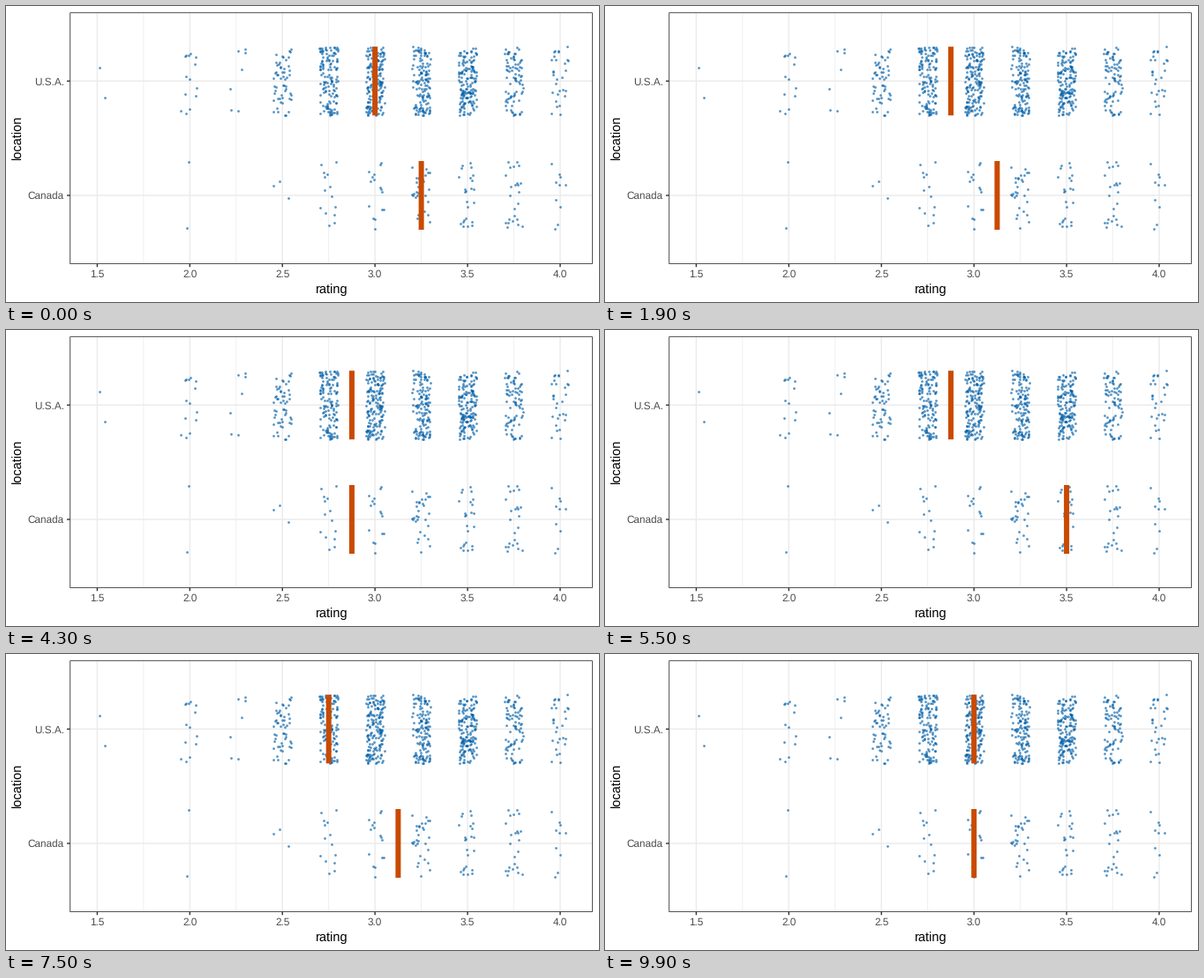
These frames come from a looping animation (672 px wide and 336 px high, 10000 ms). A matplotlib script:

```python
import numpy as np
import matplotlib.pyplot as plt
from matplotlib.animation import FuncAnimation

W, H, DPI = 672, 336, 100
PX = 72 / DPI  # points per pixel
LEFT, TOP, RIGHT, BOTTOM = 72.7, 7.7, 664.4, 292.6
ROW = {"U.S.A.": 85.2, "Canada": 215}
HALF = 39  # half height of a bar and of the jitter band
BLUE, ORANGE, GRID, DARK, GREY = "#005FA8", "#C94A00", "#EBEBEB", "#333333", "#4D4D4D"
STEPS = 4  # three still frames and one halfway frame per draw

plt.rcParams.update({"font.family": "Liberation Sans", "path.snap": False,
                     "text.hinting": "none"})

# One drawn rating per location (U.S.A., Canada); each holds, then slides on.
DRAWS = np.array([
    (3, 3.25), (2.5, 3.75), (3, 3.5), (3.25, 4), (3, 3.25),
    (2.75, 3), (3, 3.25), (3.75, 3), (2.75, 3.25), (3, 3.5),
    (2.75, 2.5), (3, 3.25), (3, 3.25), (3.25, 3.25), (2.5, 3.75),
    (3.25, 2.75), (3, 4), (3.5, 3.5), (3, 3.25), (2.5, 3),
    (3.5, 4), (3, 3.25), (3, 3.25), (2, 3.5), (3, 2.75),
])

# Points per quarter step of rating, from 1.5 to 4.
RATINGS = np.arange(1.5, 4.1, 0.25)
COUNTS = {
    "U.S.A.": [2, 0, 14, 7, 55, 130, 165, 135, 155, 80, 29],
    "Canada": [0, 0, 2, 0, 3, 14, 16, 30, 24, 24, 10],
}


def px(rating):
    return 103.4 + (rating - 1.5) * 209.84


def jittered(name, rng):
    rating = np.repeat(RATINGS, COUNTS[name])
    x = px(rating + rng.uniform(-0.05, 0.05, rating.size))
    y = ROW[name] + rng.uniform(-HALF, HALF, rating.size)
    return x, y


fig = plt.figure(figsize=(W / DPI, H / DPI), dpi=DPI, facecolor="white")
ax = fig.add_axes([0, 0, 1, 1])
ax.set(xlim=(0, W), ylim=(H, 0))
ax.axis("off")


def line(x, y, color, width, z):
    return ax.plot(x, y, color=color, lw=width * PX, zorder=z,
                   solid_capstyle="butt")[0]


def label(x, y, text, size, color, ha="center", rotation=0):
    ax.text(x, y, text, fontsize=size * PX, color=color, ha=ha, va="baseline",
            rotation=rotation, rotation_mode="anchor")


for x, rating in zip(px(RATINGS), RATINGS):
    major = rating % 0.5 == 0
    line([x, x], [TOP, BOTTOM], GRID, 1.42 if major else 0.71, 1)
    if major:
        line([x, x], [BOTTOM, BOTTOM + 3.67], DARK, 1.42, 4)
        label(x, 308, f"{rating:.1f}", 11.73, GREY)

rng = np.random.default_rng(7)
bars = []
for name, y in ROW.items():
    line([LEFT, RIGHT], [y, y], GRID, 1.42, 1)
    line([LEFT - 3.67, LEFT], [y, y], DARK, 1.42, 4)
    label(66, y + 4.2, name, 11.73, GREY, ha="right")
    ax.scatter(*jittered(name, rng), s=(2.75 * PX) ** 2, color=BLUE, alpha=0.68,
               linewidths=0, zorder=2, snap=False)
    bars.append(line([0, 0], [y - HALF, y + HALF], ORANGE, 6, 3))

label((LEFT + RIGHT) / 2, 326, "rating", 14.67, "black")
label(18, (TOP + BOTTOM) / 2, "location", 14.67, "black", rotation=90)
ax.add_patch(plt.Rectangle((LEFT, TOP), RIGHT - LEFT, BOTTOM - TOP, fill=False,
                           ec=DARK, lw=0.85 * PX, zorder=4, snap=False))


def update(i):
    k, step = divmod(i, STEPS)
    t = max(0, step - 2) / 2
    ratings = (1 - t) * DRAWS[k] + t * DRAWS[(k + 1) % len(DRAWS)]
    for bar, rating in zip(bars, ratings):
        bar.set_xdata([px(rating)] * 2)
    return bars


anim = FuncAnimation(fig, update, frames=STEPS * len(DRAWS), interval=100,
                     repeat=True, repeat_delay=0)
plt.show()
```
